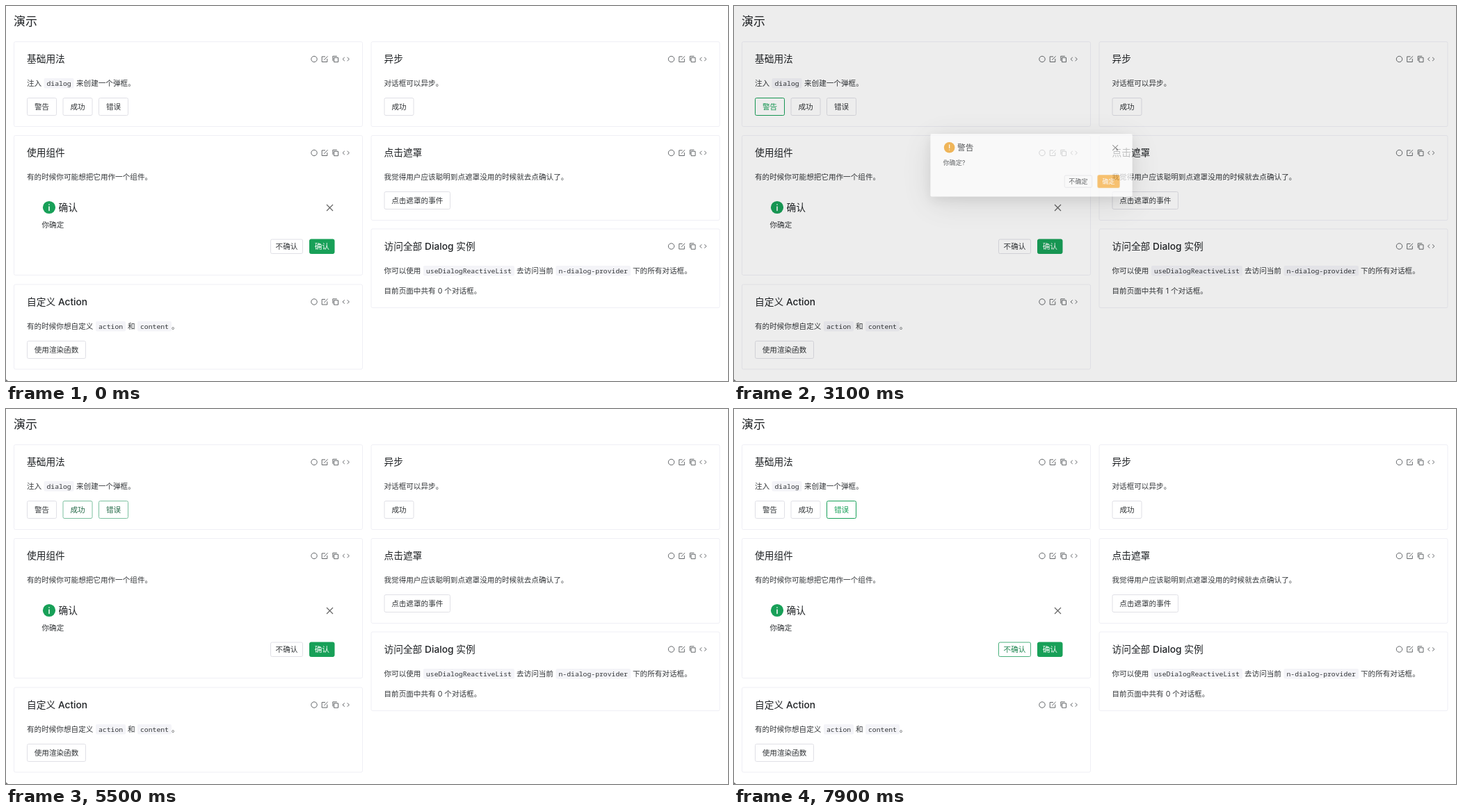
These frames come from a looping animation (1038x540 px, 8 s). An HTML page:

```html
<!DOCTYPE html>
<html lang="zh-CN">
<head>
<meta charset="utf-8">
<title>演示</title>
<style>
  html, body { margin: 0; width: 100%; height: 100%; overflow: hidden; background: #fff; }
  svg { display: block; width: 1038px; height: 540px; }
  text { font: 10.6px Inter, "Noto Sans CJK SC", "Noto Sans CJK", sans-serif; fill: #333639; white-space: pre; }
  .title { font-size: 13.7px; fill: #1f2225; }
  .head { font-size: 16.9px; fill: #1f2225; }
  .mono { font: 9.75px "Noto Sans Mono", monospace; }
  .latin { font-weight: 500; }
  .mid { text-anchor: middle; }
  .card { fill: #fff; stroke: #efeff5; }
  .code { fill: #f4f4f8; }
  .icon { fill: none; stroke: #5c5f63; stroke-width: .95; }
  .cross { fill: none; stroke: #666; stroke-width: 1.2; }
  .mark { fill: none; stroke: #fff; stroke-width: 1.5; stroke-linecap: round; }
  .box { fill: #fff; filter: drop-shadow(0 6px 9px rgb(0 0 0 / .1)) drop-shadow(0 10px 26px rgb(0 0 0 / .14)); }
</style>
</head>
<body>
<svg id="stage" viewBox="0 0 1038 540"></svg>
<script>
const GREEN = '#18a058', LINE = '#e0e0e6', INK = '#333639';
const stage = document.getElementById('stage');
const $ = id => document.getElementById(id);

// Markup helpers
const text = (x, y, s, cls = '') => `<text x="${x}" y="${y}" class="${cls}">${s}</text>`;
const rect = (x, y, w, h, attrs = '') => `<rect x="${x}" y="${y}" width="${w}" height="${h}" rx="2" ${attrs}/>`;
const code = (x, y, s) => rect(x, y - 11, s.length * 5.85 + 8, 14.5, 'class="code"') + text(x + 4, y - .5, s, 'mono');
const cross = (x, y) => `<path class="cross" d="M${x - 4.5} ${y - 4.5}l9 9m0-9l-9 9"/>`;

function button(id, x, y, w, h, label, fill) {
  const paint = fill ? `fill="${fill}" stroke="${fill}"` : `fill="#fff" stroke="${LINE}"`;
  return `<g id="${id}">` + rect(x, y, w, h, `fill="none" stroke="${fill || GREEN}" stroke-width="0"`) +
    rect(x, y, w, h, paint) +
    `<text class="mid" x="${x + w / 2}" y="${y + h / 2 + 4}" style="fill:${fill ? '#fff' : INK};font-weight:${fill ? 500 : 400}">${label}</text></g>`;
}

const marks = {
  info: 'M0-4.2v.1M0-1V4.6',
  warn: 'M0-4.5V.8M0 4v.1',
  done: 'M-3.6.2l2.4 2.5 4.8-5',
  fail: 'M-2.8-2.8l5.6 5.6m0-5.6l-5.6 5.6'
};
const badge = (x, y, kind, color) =>
  `<g transform="translate(${x} ${y})"><circle r="9.1" fill="${color}"/><path class="mark" d="${marks[kind]}"/></g>`;

function card(x, y, h, title) {
  const tools = `<g class="icon" transform="translate(${x + 431.5} ${y + 25})">
    <circle r="4.2"/>
    <path d="M16-3.6h-4.8v7.6h7.6V-.5M14.2 1.2l5.4-5.4"/>
    <path d="M28.5-2.2h6v6.4h-6zM26.8 2.4v-6.6h6"/>
    <path d="M43.8-2.6L41 0l2.8 2.6M47.6-2.6L50.4 0l-2.8 2.6"/></g>`;
  return rect(x, y, 501, h, 'class="card"') + text(x + 18.5, y + 29.5, title, 'title') + tools;
}
const latin = s => `<tspan class="latin">${s}</tspan>`;

const page = [
  text(11, 28, '演示', 'head'),
  card(11.5, 51.5, 122, '基础用法'),
  text(30, 115, '注入'), code(54.5, 115, 'dialog'), text(101, 115, '来创建一个弹框。'),
  button('warnBtn', 30.5, 132.5, 42, 25, '警告'),
  button('doneBtn', 82, 132.5, 42, 25, '成功'),
  button('failBtn', 133.5, 132.5, 42, 25, '错误'),

  card(11.5, 186.5, 201, '使用组件'),
  text(30, 250, '有的时候你可能想把它用作一个组件。'),
  badge(62, 290, 'info', GREEN), text(75.5, 294.5, '确认', 'title'), cross(465.5, 290.5),
  text(51.5, 319, '你确定'),
  button('denyBtn', 380.5, 336, 46, 20.5, '不确认'),
  button('okBtn', 436.5, 336, 35.5, 20.5, '确认', GREEN),

  card(11.5, 401, 122, `自定义 ${latin('Action')}`),
  text(30, 465, '有的时候你想自定义'), code(129, 465, 'action'), text(175, 465, '和'),
  code(189, 465, 'content'), text(238, 465, '。'),
  button('renderBtn', 30.5, 482.5, 84, 25, '使用渲染函数'),

  card(525, 51.5, 122, '异步'),
  text(543.5, 115, '对话框可以异步。'),
  button('asyncBtn', 544, 132.5, 42, 25, '成功'),

  card(525, 186.5, 122, '点击遮罩'),
  text(543.5, 250, '我觉得用户应该聪明到点遮罩没用的时候就去点确认了。'),
  button('maskBtn', 544, 267.5, 94.5, 25, '点击遮罩的事件'),

  card(525, 321, 113.5, `访问全部 ${latin('Dialog')} 实例`),
  text(543.5, 385, '你可以使用'), code(600, 385, 'useDialogReactiveList'), text(734, 385, '去访问当前'),
  code(790.5, 385, 'n-dialog-provider'), text(901, 385, '下的所有对话框。'),
  text(543.5, 413.5, '目前页面中共有 <tspan id="count">0</tspan> 个对话框。'),
  '<path d="M0 537.5L3 540H0Z" fill="#777"/>'
].join('');

// Each dialog grows out of the point (x, y) where its button was pressed
const dialogs = [
  { kind: 'warn', x: 48, y: 138, color: '#f0a020', hot: '#fcb040', title: '警告', message: '你确定?', ok: '确定', deny: '不确定',
    press: 700, open: 735, hover: 2600, click: 3000, shadeOut: 2992, boxOut: 2985 },
  { kind: 'done', x: 115, y: 143, color: GREEN, hot: '#249b5f', title: '成功', message: '厉害', ok: '哇',
    press: 3700, open: 3735, hover: 4400, click: 4700, shadeOut: 4752, boxOut: 4782 },
  { kind: 'fail', x: 168, y: 146, color: '#d03050', hot: '#de576d', title: '错误', message: '错了', ok: '啊',
    press: 5600, open: 5683, hover: 6600, click: 6700, shadeOut: 6690, boxOut: 6690 }
];

function dialogMarkup(d) {
  const okWidth = d.deny ? 35.5 : 25;
  return `<g id="${d.kind}">` + rect(321, 192, 338, 105, 'class="box"') +
    badge(352.7, 214.5, d.kind, d.color) + text(366, 219, d.title, 'title') +
    rect(622, 207, 17, 16, `id="${d.kind}Focus" fill="#e4e4e4"`) + cross(630.5, 215) +
    text(342, 244, d.message) +
    (d.deny ? button(d.kind + 'Deny', 545.5, 261.5, 46, 20, d.deny) : '') +
    button(d.kind + 'Ok', 637 - okWidth, 261.5, okWidth, 20, d.ok, d.color) + '</g>';
}
stage.innerHTML = page + '<rect id="shade" width="1038" height="540"/>' + dialogs.map(dialogMarkup).join('');

// Timing helpers
const clamp = v => Math.min(1, Math.max(0, v));
const ramp = (t, on, off = 1e9, time = 200) => clamp((t - on) / time) - clamp((t - off) / time);
const bezier = (x1, y1, x2, y2) => x => {
  if (x <= 0 || x >= 1) return clamp(x);
  const at = (a, b, u) => 3 * a * u * (1 - u) ** 2 + 3 * b * u * u * (1 - u) + u ** 3;
  let lo = 0, hi = 1;
  for (let i = 0; i < 24; i++) {
    const u = (lo + hi) / 2;
    if (at(x1, x2, u) < x) lo = u; else hi = u;
  }
  return at(y1, y2, lo);
};
const easeOut = bezier(0, 0, .2, 1), easeIn = bezier(.4, 0, 1, 1), easeInOut = bezier(.4, 0, .2, 1);

function mix(from, to, k) {
  const part = (c, i) => parseInt(c.slice(i, i + 2), 16);
  return `rgb(${[1, 3, 5].map(i => Math.round(part(from, i) * (1 - k) + part(to, i) * k))})`;
}
function tint(id, k) {
  const [, face, label] = $(id).children;
  face.setAttribute('stroke', mix(LINE, GREEN, k));
  label.style.fill = mix(INK, GREEN, k);
}
function wave(id, age) {
  const k = age < 0 ? 1 : easeOut(clamp(age / 600));
  const ring = $(id).firstChild;
  ring.setAttribute('stroke-width', k < 1 ? 6 * k : 0);
  ring.setAttribute('stroke-opacity', .6 * (1 - k) + (k < 1 ? .12 : 0));
}

function render(t) {
  let shade = 0, count = 0;
  for (const d of dialogs) {
    const grown = easeOut((t - d.open) / 250);
    const size = grown * (1 - easeIn((t - d.boxOut) / 250));
    const scale = .5 + size / 2;
    shade += grown * (1 - easeInOut((t - d.shadeOut) / 200));
    count += size > 0 ? 1 : 0;
    const group = $(d.kind);
    group.style.display = size > 0 ? '' : 'none';
    group.style.opacity = size;
    group.setAttribute('transform', `translate(${d.x * (1 - scale)} ${d.y * (1 - scale)}) scale(${scale})`);
    $(d.kind + 'Focus').style.display = t < d.click ? '' : 'none';
    const face = $(d.kind + 'Ok').children[1];
    const color = mix(d.color, d.hot, ramp(t, d.hover));
    face.setAttribute('fill', color);
    face.setAttribute('stroke', color);
    wave(d.kind + 'Ok', t - d.click);
    wave(d.kind + 'Btn', t - d.press);
  }
  $('shade').setAttribute('fill-opacity', .4 * shade);
  $('count').textContent = count;

  tint('warnBtn', ramp(t, 400, 700) + ramp(t, 2900, 3600));
  tint('doneBtn', ramp(t, 3600, 3700) + ramp(t, 4800, 5400));
  tint('failBtn', ramp(t, 5400, 5600) + ramp(t, 6600));
  tint('warnDeny', ramp(t, 2000, 1e9, 300) - ramp(t, 2600));
  tint('denyBtn', ramp(t, 7300) - .25 * ramp(t, 7800, 1e9, 100));
}

// The picture advances in steps of 100 ms
function tick() {
  render(Math.floor(performance.now() % 8000 / 100) * 100);
  requestAnimationFrame(tick);
}
tick();
</script>
</body>
</html>
```
